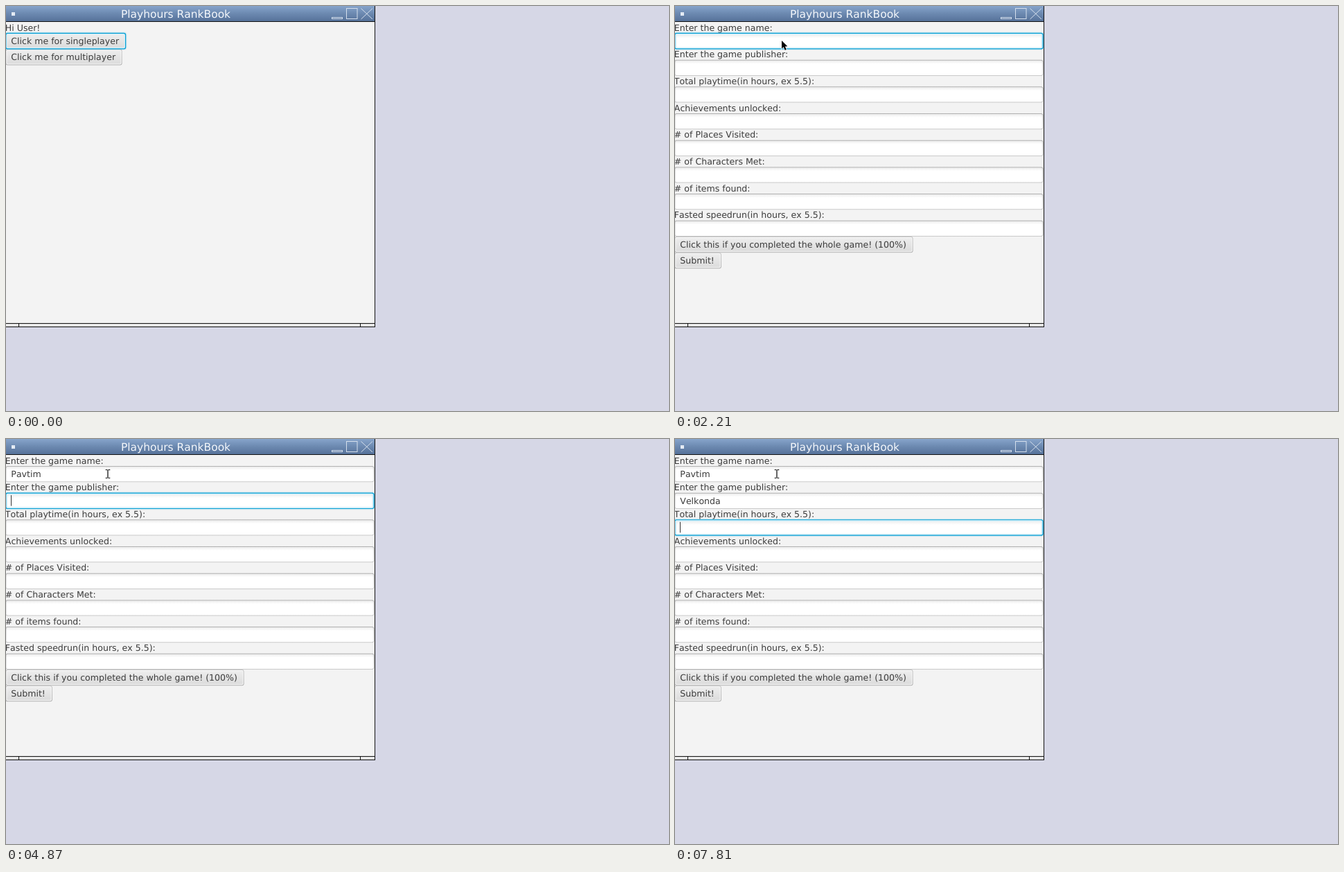
Animation of 957x585 px, one loop 8 s. Source, as an HTML page with a canvas:

```html
<!DOCTYPE html>
<html lang="en">
<head>
<meta charset="utf-8">
<title>Playhours RankBook</title>
<style>
  html, body { margin: 0; width: 100%; height: 100%; overflow: hidden; background: #d6d7e6; }
  canvas { display: block; }
</style>
</head>
<body>
<canvas id="stage" width="957" height="585"></canvas>
<script>
const ctx = document.getElementById('stage').getContext('2d');
const LOOP = 8000;
const FONT = '"DejaVu Sans", sans-serif';
const SIZE = 12.57;
const PITCH = 38.68;   // label plus field
const ROW = 23.2;      // height of a button or field
const TOP = 39;
const LEFT = -0.6;
const FOCUS = '#039ed3';
const GLOW = 'rgba(3,158,211,.14)';
const TEXT = '#3c3c3c';

const labels = [
  'Enter the game name:',
  'Enter the game publisher:',
  'Total playtime(in hours, ex 5.5):',
  'Achievements unlocked:',
  '# of Places Visited:',
  '# of Characters Met:',
  '# of items found:',
  'Fasted speedrun(in hours, ex 5.5):'
];

const typed = [
  { text: 'Pavtim', keys: [3680, 3810, 4080, 4280, 4410, 4610] },
  { text: 'Velkonda', keys: [5480, 5680, 5950, 6150, 6490, 6950, 7150, 7350] }
];

// Arrow positions, one per step of about 69 ms
const path = [
  [860, 556], [800, 518], [715, 462], [615, 400], [540, 352], [482, 318],
  [443, 293], [360, 221], [257, 149], [201, 115], [160, 60], [156, 54],
  [155, 51], [154, 50]
];

function rect(x, y, w, h, fill) {
  ctx.fillStyle = fill;
  ctx.fillRect(x, y, w, h);
}

// Rounded box of one row, shrunk by inset on all sides
function box(y, w, inset, r, fill) {
  ctx.beginPath();
  ctx.roundRect(LEFT + inset, y + inset, w - 2 * inset, ROW - 2 * inset, r);
  ctx.fillStyle = fill;
  ctx.fill();
}

function shade(y0, y1, ...colors) {
  const g = ctx.createLinearGradient(0, y0, 0, y1);
  colors.forEach((c, i) => g.addColorStop(i / (colors.length - 1), c));
  return g;
}

function text(str, x, y, color = TEXT, size = SIZE, align = 'left') {
  ctx.font = `${size}px ${FONT}`;
  ctx.textRendering = 'geometricPrecision';
  ctx.fontKerning = 'none';
  ctx.textAlign = align;
  ctx.fillStyle = color;
  ctx.fillText(str, x, y);
}

function line(color, ...pts) {
  ctx.beginPath();
  pts.forEach(([x, y], i) => i ? ctx.lineTo(x, y) : ctx.moveTo(x, y));
  ctx.strokeStyle = color;
  ctx.lineWidth = 1;
  ctx.stroke();
}

function drawWindow() {
  rect(0, 0, 957, 585, '#d6d7e6');
  rect(0, 0, 533, 464, '#111');
  rect(0, 0, 532, 22, shade(0, 22, '#86a4cb', '#6c89b0', '#56729a'));
  rect(0, 23, 532, 435, '#f3f3f3');
  rect(0, 459, 532, 4, '#e6e6e6');
  rect(18, 458, 1, 5, '#111');
  rect(511, 458, 1, 5, '#111');
  rect(8, 9, 5, 5, '#e4ebf4');
  text('Playhours RankBook', 245, 17.4, '#f4f7fb', 15.47, 'center');

  ctx.strokeStyle = '#d5dfec';
  ctx.lineWidth = 1;
  ctx.strokeRect(470.5, 16.5, 15, 2);
  ctx.strokeRect(491.5, 3.5, 15.5, 15);
  line('#d5dfec', [512.5, 3.5], [529, 19]);
  line('#d5dfec', [529, 3.5], [512.5, 19]);
}

function button(label, y, w, { hover = false, focused = false } = {}) {
  const body = shade(y, y + ROW, ...(hover ? ['#fcfcfc', '#e6e6e6'] : ['#efefef', '#dadada']));
  if (focused) {
    box(y, w, -0.2, 3, FOCUS);
    box(y, w, 1, 2, '#fbfbfb');
    box(y, w, -1.4, 4, GLOW);
    box(y, w, 2.4, 1, body);
  } else {
    box(y, w, 0, 3, shade(y, y + ROW, '#c4c4c4', '#aeaeae'));
    box(y, w, 1, 2, '#fbfbfb');
    box(y, w, 2, 1, body);
  }
  text(label, 7.3, y + 16);
}

function field(y, focused) {
  const w = 532;
  if (focused) {
    box(y, w, -0.2, 3, FOCUS);
    box(y, w, 1, 2, '#fff');
    box(y, w, -1.4, 4, GLOW);
    box(y, w, 2.8, 0, shade(y + 2.8, y + 7.6, '#f0f0f0', '#fff'));
  } else {
    box(y, w, 0, 3, shade(y, y + ROW, '#b2b2b2', '#cacaca'));
    box(y, w, 1, 2, shade(y + 1, y + 5.8, '#ececec', '#fff'));
  }
}

function drawMenu(t) {
  text('Hi User!', -1.2, 35.6);
  button('Click me for multiplayer', TOP + ROW, 168.2, { hover: t >= 1010 && t < 1220 });
  button('Click me for singleplayer', TOP, 173.6, { hover: t >= 1220, focused: true });
}

function caretOn(t) {
  return (t >= 2610 && t < 3090) || (t >= 3680 && t < 5410) || t >= 5480;
}

function drawForm(t) {
  const active = t < 4870 ? 0 : t < 7810 ? 1 : 2;
  labels.forEach((label, i) => {
    const y = TOP + i * PITCH;
    const entry = typed[i];
    const value = entry ? entry.text.slice(0, entry.keys.filter(k => k <= t).length) : '';
    text(label, -1.2, y - 3.4);
    field(y, i === active);
    text(value, 7.3, y + 15.9);
    if (i === active && caretOn(t)) {
      rect(Math.round(7.3 + ctx.measureText(value).width), y + 3.5, 1, 15.5, '#333');
    }
  });
  const end = TOP + 7 * PITCH + ROW;
  button('Click this if you completed the whole game! (100%)', end, 344.2);
  button('Submit!', end + ROW, 67.5);
}

function arrow(x, y) {
  const pts = [[0, 0], [0, 11.5], [2.7, 9.2], [4.7, 13.8], [6.8, 12.9], [4.9, 8.5], [8.3, 8.2]];
  ctx.beginPath();
  pts.forEach(([dx, dy]) => ctx.lineTo(x + dx, y + dy));
  ctx.closePath();
  ctx.strokeStyle = 'rgba(255,255,255,.8)';
  ctx.lineWidth = 1.6;
  ctx.stroke();
  ctx.fillStyle = '#000';
  ctx.fill();
}

function beam(x, y) {
  for (const [pad, color] of [[0.8, '#fff'], [0, '#000']]) {
    const bar = (dx, dy, w, h) =>
      rect(x + dx - pad, y + dy - pad, w + 2 * pad, h + 2 * pad, color);
    bar(-0.6, -6, 1.2, 12);
    for (const dy of [-6.4, 5.4]) {
      bar(-3.3, dy, 2.6, 1);
      bar(0.7, dy, 2.6, 1);
    }
  }
}

function drawPointer(t) {
  if (t < 390) return;
  if (t >= 2280) {
    beam(t < 2610 ? 154 : t < 2680 ? 152 : t < 2750 ? 149 : 147, 50.4);
    return;
  }
  const step = Math.min(path.length - 1, Math.floor((t - 390) / 69));
  const [x, y] = path[step];
  if (t >= 1820 && t < 2010) {
    ctx.beginPath();
    ctx.arc(x, y + 0.5, 11, 0, Math.PI * 2);
    ctx.fillStyle = 'rgba(245,235,30,.68)';
    ctx.fill();
  }
  arrow(x, y);
}

const start = performance.now();

function draw() {
  const t = (performance.now() - start) % LOOP;
  drawWindow();
  if (t < 2210) drawMenu(t);
  else drawForm(t);
  drawPointer(t);
  requestAnimationFrame(draw);
}

draw();
</script>
</body>
</html>
```
